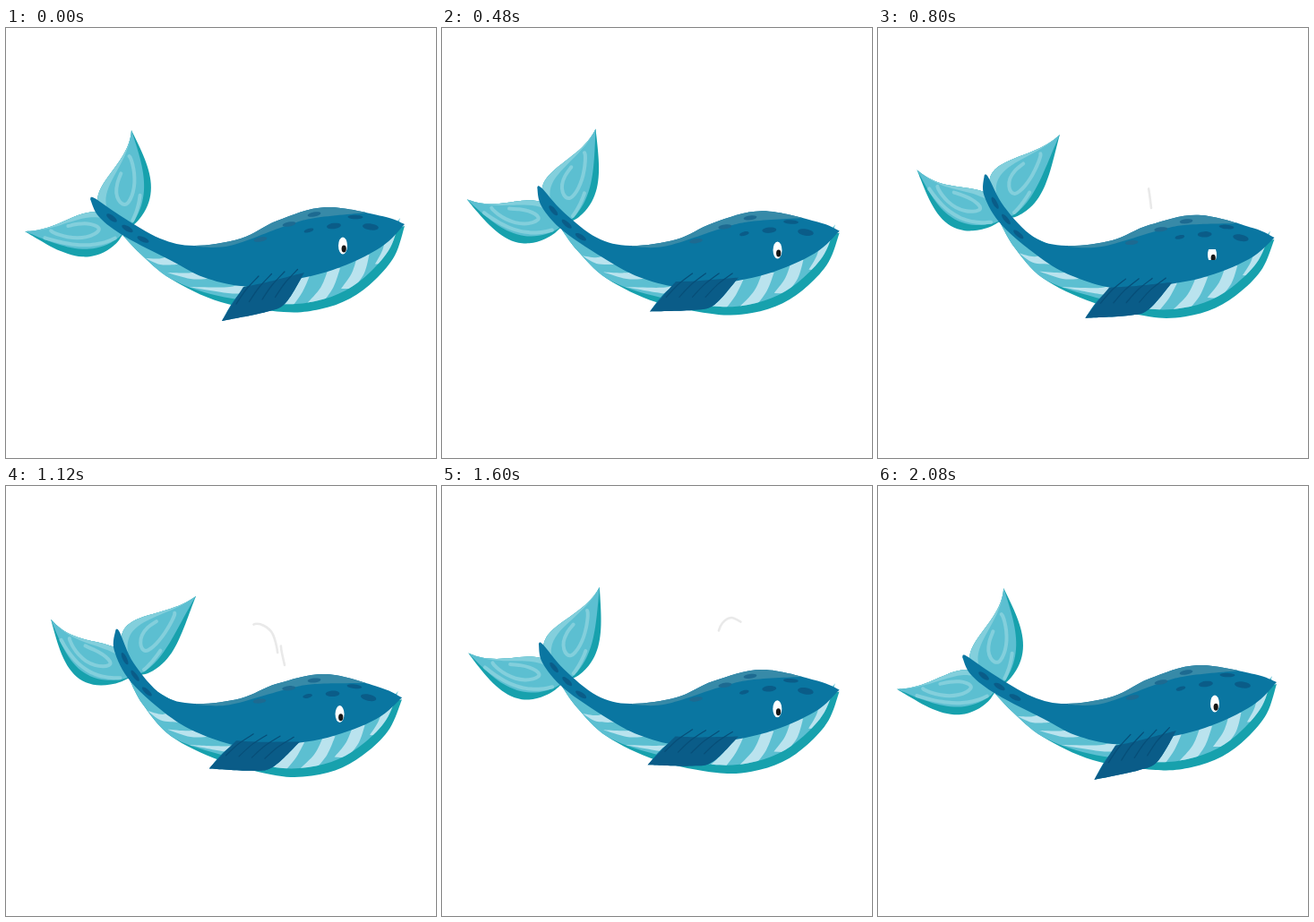
These frames come from a looping animation (480x480 px, 2.12 s). An HTML page with a canvas:

```html
<!DOCTYPE html>
<html lang="en">
<head>
<meta charset="utf-8">
<title>Whale</title>
<style>
html, body { margin: 0; width: 100%; height: 100%; overflow: hidden; background: #fff; }
canvas { display: block; width: 480px; height: 480px; }
</style>
</head>
<body>
<canvas id="stage" width="480" height="480"></canvas>
<script>
const ctx = document.getElementById('stage').getContext('2d');
const { PI, sin, cos, min, max } = Math;
const LOOP = 2120, STEP = 40;
const BLUE = '#0a76a1', NAVY = '#0a5c88', INK = '#074e78', TEAL = '#17a1ad';
const AQUA = '#5cbfd1', PALE = '#83cfdc', ICE = '#bae3ee', MIST = '#e9e9e9';

// Key points of the body: back, mouth line and belly.
const BACK = [[94, 191], [99, 190], [130, 211], [172, 235], [210, 243], [262, 235], [303, 215], [357, 200], [420, 210], [445, 219]];
const MOUTH = [[445, 219], [418, 245], [365, 270], [300, 285], [262, 288], [220, 278], [185, 260], [133, 233], [104, 211], [94, 191]];
const BELLY = [[131, 232], [150, 252], [184, 280], [240, 306], [310, 317], [350, 314], [384, 302], [412, 281], [434, 254], [445, 221]];
const COVER = [[430, 225], [300, 260], [200, 245], [131, 225]];

let swing = 0, finTurn = 0;

const smooth = (x, a, b) => {
  const k = min(1, max(0, (x - a) / (b - a)));
  return k * k * (3 - 2 * k);
};
const turn = ([x, y], cx, cy, a) => {
  const c = cos(a), s = sin(a), dx = x - cx, dy = y - cy;
  return [cx + dx * c - dy * s, cy + dx * s + dy * c];
};
const range = (n, f) => Array.from({ length: n + 1 }, (_, i) => f(i / n));

// The head dips about the middle; the stalk curls more towards its tip.
function bend([x, y]) {
  const h = max(0, x - 235), s = max(0, (200 - x) / 105) ** 2;
  const u = y - 190 - 0.57 * (x - 95);
  const lean = 0.083 * (y - 235) * min(1, h / 80);
  return [
    x + swing * (s * (29 - 0.55 * u) - 0.02 * h - lean),
    y + swing * (0.083 * h - s * (30 + 0.2 * u))
  ];
}
const fin = p => {
  const [x, y] = bend(turn(p, 330, 276, finTurn));
  return [x + 0.07 * swing * (x - 333), y + 4 * swing];
};
const still = p => p;

// Smooth curves through points; corners where two lists meet.
function trace(warp, ...lists) {
  ctx.beginPath();
  lists.forEach((list, n) => {
    const p = list.map(warp);
    n ? ctx.lineTo(...p[0]) : ctx.moveTo(...p[0]);
    for (let i = 0; i < p.length - 1; i++) {
      const b = p[i], c = p[i + 1], a = p[i - 1] || b, d = p[i + 2] || c;
      ctx.bezierCurveTo(
        b[0] + (c[0] - a[0]) / 6, b[1] + (c[1] - a[1]) / 6,
        c[0] - (d[0] - b[0]) / 6, c[1] - (d[1] - b[1]) / 6, ...c);
    }
  });
}
function fill(color, warp, ...lists) {
  trace(warp, ...lists);
  ctx.closePath();
  ctx.fillStyle = color;
  ctx.fill();
}
function line(color, width, warp, list) {
  trace(warp, list);
  ctx.strokeStyle = color;
  ctx.lineWidth = width;
  ctx.lineCap = 'round';
  ctx.stroke();
}
function spot(color, x, y, rx, ry, tilt) {
  fill(color, bend, range(12, k =>
    turn([x + rx * cos(2 * PI * k), y + ry * sin(2 * PI * k)], x, y, tilt)));
}

// Both flukes share one outline: u runs from root to tip, v from inner (-1) to outer (1) edge.
function drawFluke(upper) {
  const inner = upper ? 33 : 21, outer = upper ? 26 : 29, tilt = upper ? 7 : 1;
  const place = ([u, v]) => {
    const side = v > 0 ? outer * sin(PI * u ** 0.75) : inner * sin(PI * u ** 0.6) ** 2;
    const off = tilt * u + v * side + (upper ? -9 : 9) * swing * sin(PI * u);
    const p = upper ? [133 + off, 226 - 112 * u] : [133 - 112 * u, 226 + off];
    return turn(p, 162, 235, swing * 0.604);
  };
  const along = (v, a = 0, b = 1) => range(14, k => [a + (b - a) * k, v]);
  const band = (color, v, w) => fill(color, place, along(v), along(w, 1, 0));
  band(TEAL, -1, 1);
  band(AQUA, -1, 0.7);
  band(PALE, -1, -0.72);
  line(PALE, 4, place, range(12, k => [0.5 + 0.24 * cos(5 * k), -0.08 + 0.36 * sin(5 * k)]));
  line(PALE, 4, place, along(0.55, 0.1, upper ? 0.35 : 0.8));
}

function drawBelly() {
  fill(TEAL, bend, BELLY, COVER);
  const rim = BELLY.map(([x, y]) => {
    const k = smooth(x, 190, 260);
    return [x - 5 * k, y - 9 * k];
  });
  ctx.save();
  fill(AQUA, bend, rim, COVER);
  ctx.clip();
  for (let i = 0; i < 3; i++) {
    const x = 186 + 30 * i + 4 * i * i, y = 258 + 16 * i;
    fill(ICE, bend, [[156 + 24 * i, y - 1], [x - 12, y - 1], [x + 2, y - 8]], [[x + 6, y + 6], [x - 14, y + 6], [156 + 24 * i, y - 1]]);
  }
  for (let i = 0; i < 4; i++) {
    const x = 334 + 32.5 * i, y = 276 - 5 * i * i, w = 10 - 1.5 * i;
    const bx = x - 26 + 4 * i, by = 313 - 5.5 * i * i;
    const edge = s => [[x + 6.5 * s, y - 3], [(x + bx) / 2 + 3 + 7 * s, (y + by) / 2], [bx + w * s, by]];
    fill(ICE, bend, edge(-1), edge(1).reverse());
  }
  ctx.restore();
}

function drawBack() {
  ctx.save();
  fill(BLUE, bend, BACK, MOUTH);
  ctx.clip();
  fill('#378aa8', bend, [[212, 244], [250, 243], [312, 221], [345, 212], [404, 206]], [[404, 190], [300, 200], [212, 230]]);
  ctx.restore();
  for (let i = 0; i < 3; i++) spot(NAVY, 118 + 17.5 * i, 212 + 12 * i, 7, 2.8, 0.65 - 0.12 * i);
  [[284, 236], [316, 219], [344, 208]].forEach(([x, y]) => spot('#1d6a91', x, y, 7.5, 2.5, -0.18));
  [[338, 226, 5.5], [366, 221, 8], [390, 211, 8.5], [407, 222, 9]].forEach(([x, y, r]) =>
    spot(NAVY, x, y, r, x === 390 ? 2.3 : 0.4 * r, (x - 386) / 170));
}

function oval(color, x, y, rx, ry) {
  ctx.fillStyle = color;
  ctx.beginPath();
  ctx.ellipse(x, y, rx, ry, 0, 0, 2 * PI);
  ctx.fill();
}
function drawEye(t) {
  const [x, y] = bend([376, 243]);
  const open = 10 * (1 - smooth(t, 600, 720) + smooth(t, 720, 860));
  ctx.save();
  ctx.beginPath();
  ctx.rect(x - 8, y - open, 16, 2 * open);
  ctx.clip();
  oval('#fff', x, y, 5, 9.5);
  oval('#171717', x + 1.2, y + 3.6, 2.6, 4);
  ctx.restore();
}

function drawFin() {
  const under = [[333, 273], [312, 307], [290, 317], [241, 327]];
  fill(BLUE, fin, [[241, 327], [256, 302], [280, 278]], [[280, 278], [333, 273]], under);
  fill(NAVY, fin, [[241, 327], [254, 306], [265, 289]], [[265, 289], [290, 284], [333, 273]], under);
  for (let i = 0; i < 4; i++) {
    const x = 282 + 14.5 * i, y = 277 - 2.5 * i;
    line(INK, 1.2, fin, [[x, y], [x - 14, y + 15], [x - 25, y + 31]]);
  }
}

// A stroke that grows from its foot and then fades out behind its head.
function drawSpout(list, t) {
  const head = 72 * smooth(t, 512, 1302), end = 72 * smooth(t, 920, 1600);
  if (head - end < 0.5) return;
  ctx.save();
  ctx.setLineDash([head - end, 300]);
  ctx.lineDashOffset = -end;
  line(MIST, 2.6, still, list);
  ctx.restore();
}

function draw(t) {
  const a = 2 * PI * t / LOOP;
  swing = (1 - cos(a)) / 2;
  finTurn = (12 * swing - 3 * sin(a) + 5.5 * sin(2 * a) + 8 * sin(a) ** 2) / 87;
  ctx.fillStyle = '#fff';
  ctx.fillRect(0, 0, 480, 480);
  drawSpout([[305, 201], [302, 179], [297, 164], [288, 156], [278, 154], [269, 160]], t);
  drawSpout([[311, 200], [307, 180], [308, 165], [313, 153], [323, 147], [334, 152]], t - 320);
  drawFluke(true);
  drawFluke(false);
  drawBelly();
  drawBack();
  drawEye(t);
  drawFin();
}

const start = performance.now();
function tick() {
  const t = max(0, performance.now() - start) % LOOP;
  draw(Math.floor(t / STEP) * STEP);
  requestAnimationFrame(tick);
}
tick();
</script>
</body>
</html>
```
